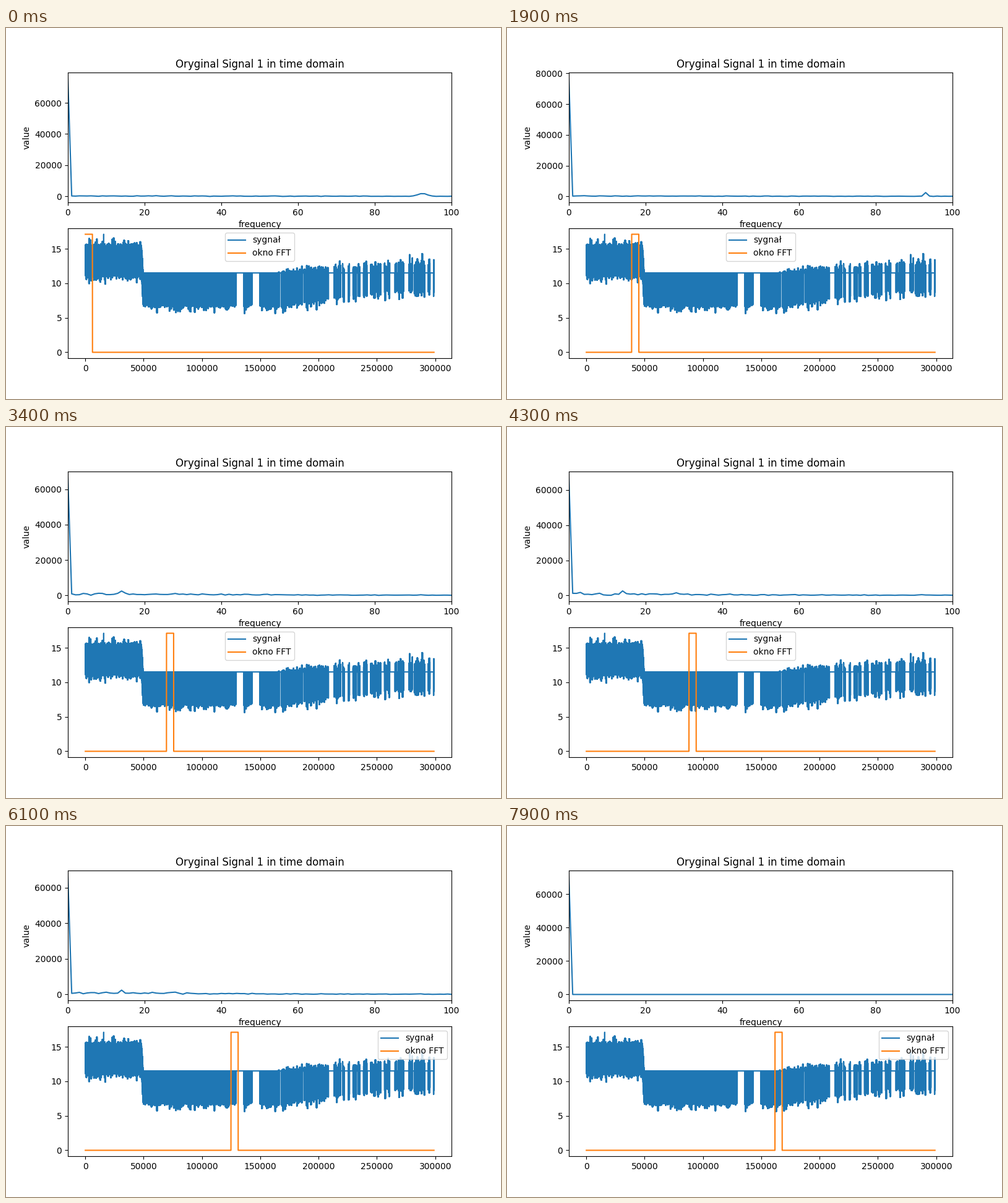
A matplotlib script that plays this animation: 800 by 600 pixels, repeating every 8000 ms.

```python
import numpy as np
import matplotlib.pyplot as plt
from matplotlib.animation import FuncAnimation

FRAMES, INTERVAL = 80, 100
TOTAL, STEP, WIDTH = 299008, 2048, 6144
REST, PEAK = 11.507, 17.12

rng = np.random.default_rng(7)
x = np.arange(0, TOTAL, 64)


def ramp(v, start, end):
    return np.clip((v - start) / (end - start), 0, 1)


def per_block(size, draw):
    """One random value per block of samples, repeated along x."""
    return draw(TOTAL // size + 1)[x // size]


def tail(n):
    """Mostly small values with a few long spikes."""
    return np.minimum(rng.exponential(size=n), 3.6)


def make_signal():
    k = x / 1000
    early = 1 - ramp(k, 48.2, 49.6)
    late = ramp(k, 165, 275)

    top = REST + 3.8 * early + late
    top += (.35 * early + .5 * np.sqrt(late)) * per_block(600, tail)
    low = 6.9 + 4.25 * early + 2.3 * late
    low -= (.35 + .15 * late) * per_block(600, tail)
    y = np.where(np.arange(len(x)) % 2, low, top)

    # Pauses grow more frequent; a few are long
    odds = .04 * (k > 97) + .4 * ramp(k, 175, 235)
    pause = per_block(1500, rng.random) < odds
    for a, b in [(129.4, 136), (142.8, 149.5), (208.5, 213.3),
                 (223, 225.4), (241.5, 244.7)]:
        pause |= (k > a) & (k < b)
    y[pause] = REST
    y[np.searchsorted(k, 15.7)] = PEAK
    return y


signal = make_signal()

# Overlapping windows share most of their noise
bins = np.arange(101)
raw = rng.normal(size=(FRAMES + 4, 101, 2))
shared = sum(raw[i:i + FRAMES] for i in range(4)) / 2
noise = np.hypot(shared[..., 0], shared[..., 1]) ** .7


def bump(center, width, height):
    return height * np.exp(-((bins - center) / width) ** 2)


def spectrum(i):
    mix = ramp(i, 25.8, 29.6)
    fast = 300 * np.exp(-bins / 110)
    slow = 800 * np.exp(-bins / 48) + 40
    mag = noise[i] * (fast + mix * (slow - fast))
    t = ramp(i, 0, 19)
    mag += (1 - mix) * bump(92.4 + .6 * t, 1.6 - t, 1800 + 600 * t)
    mag += mix * (bump(14, .8, 1900) + bump(28, 1, 700) + bump(92, 1, 250))
    mag *= 1 - ramp(i, 75.2, 79)
    mag[0] = np.interp(i, [0, 5, 25.8, 30, 34, 43, 53, 75, 79],
                       [75640, 76500, 76750, 65200, 66700,
                        67190, 66230, 66740, 70700])
    return mag


fig, (ax_f, ax_t) = plt.subplots(2, 1, figsize=(8, 6), dpi=100)
ax_f.set_title("Oryginal Signal 1 in time domain")
ax_f.set_xlabel("frequency")
ax_f.set_ylabel("value")
ax_f.set_xlim(0, 100)
spec_line, = ax_f.plot(bins, spectrum(0))

ax_t.plot(x, signal, label="sygnał")
win_line, = ax_t.plot(x, 0 * x, label="okno FFT")
ax_t.set_xlim(-.05 * TOTAL, 1.05 * TOTAL)
ax_t.set_ylim(-.05 * PEAK, 1.05 * PEAK)


def update(i):
    mag = spectrum(i)
    spec_line.set_ydata(mag)
    ax_f.set_ylim(-.05 * mag[0], 1.05 * mag[0])
    start = i * STEP
    win_line.set_ydata(np.where((x >= start) & (x < start + WIDTH), PEAK, 0))
    # The legend steps aside once the window reaches it
    ax_t.legend(loc="upper center" if i < 56 else "upper right")
    return spec_line, win_line


anim = FuncAnimation(fig, update, frames=FRAMES, interval=INTERVAL, repeat=True)
plt.show()
```
